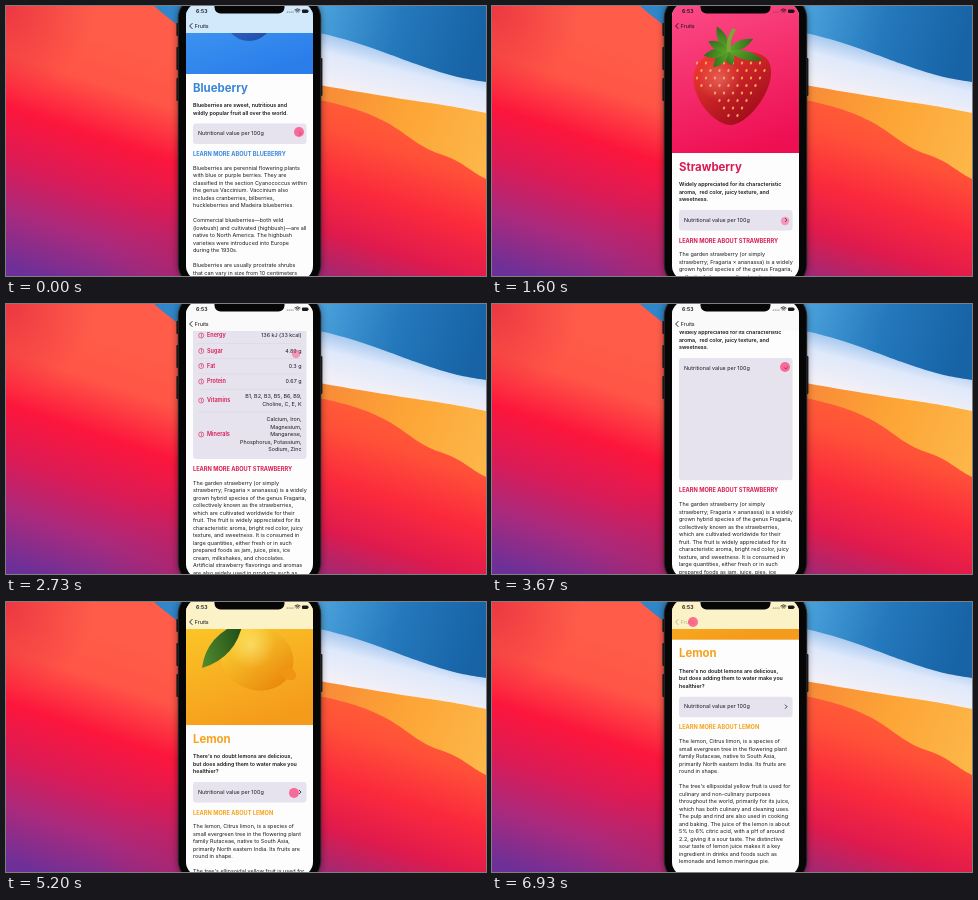
These frames come from a looping animation (480 px wide and 270 px high, 6.99 s). An HTML page with a canvas:

```html
<!DOCTYPE html>
<html lang="en">
<head>
<meta charset="utf-8">
<title>Fruits</title>
<style>
html, body { margin: 0; width: 100%; height: 100%; overflow: hidden; background: #e8374a; }
canvas { display: block; width: 480px; height: 270px; }
</style>
</head>
<body>
<canvas id="stage"></canvas>
<script>
const LOOP = 6990, LEFT = 180, WIDTH = 127, LINE = 7.5, CLOSED = 20.5, OPEN = 146;
const canvas = document.getElementById('stage');
const c = canvas.getContext('2d');
const dpr = window.devicePixelRatio || 1;
canvas.width = 480 * dpr;
canvas.height = 270 * dpr;

const fruits = [
  { name: 'Blueberry', accent: '#3a86d8', hero: ['#58b4fa', '#2b7eea'], skin: ['#4f86e0', '#1d4aa8'],
    intro: ['Blueberries are sweet, nutritious and', 'wildly popular fruit all over the world.'],
    body: ['Blueberries are perennial flowering plants', 'with blue or purple berries. They are',
      'classified in the section Cyanococcus within', 'the genus Vaccinium. Vaccinium also',
      'includes cranberries, bilberries,', 'huckleberries and Madeira blueberries.', '',
      'Commercial blueberries—both wild', '(lowbush) and cultivated (highbush)—are all',
      'native to North America. The highbush', 'varieties were introduced into Europe', 'during the 1930s.', '',
      'Blueberries are usually prostrate shrubs', 'that can vary in size from 10 centimeters'] },
  { name: 'Strawberry', accent: '#d81b52', hero: ['#fb4a86', '#ee0f52'], skin: ['#f23a32', '#9c0a1a'],
    intro: ['Widely appreciated for its characteristic', 'aroma,  red color, juicy texture, and', 'sweetness.'],
    facts: ['136 kJ (33 kcal)', '4.89 g', '0.3 g', '0.67 g', 'B1, B2, B3, B5, B6, B9,|Choline, C, E, K',
      'Calcium, Iron,|Magnesium,|Manganese,|Phosphorus, Potassium,|Sodium, Zinc'],
    body: ['The garden strawberry (or simply', 'strawberry; Fragaria × ananassa) is a widely',
      'grown hybrid species of the genus Fragaria,', 'collectively known as the strawberries,',
      'which are cultivated worldwide for their', 'fruit. The fruit is widely appreciated for its',
      'characteristic aroma, bright red color, juicy', 'texture, and sweetness. It is consumed in',
      'large quantities, either fresh or in such', 'prepared foods as jam, juice, pies, ice',
      'cream, milkshakes, and chocolates.', 'Artificial strawberry flavorings and aromas',
      'are also widely used in products such as', 'candy, soap, lip gloss, and perfume.'] },
  { name: 'Lemon', accent: '#f5a31c', hero: ['#fdd62c', '#f59b1b'], skin: ['#ffe23c', '#ea8a0c'],
    intro: ["There's no doubt lemons are delicious,", 'but does adding them to water make you', 'healthier?'],
    facts: ['121 kJ (29 kcal)', '2.5 g', '0.3 g', '1.1 g', 'B1, B2, B3, B5, B6, B9,|Choline, C',
      'Calcium, Iron,|Magnesium,|Manganese,|Phosphorus, Potassium,|Zinc'],
    body: ['The lemon, Citrus limon, is a species of', 'small evergreen tree in the flowering plant',
      'family Rutaceae, native to South Asia,', 'primarily North eastern India. Its fruits are', 'round in shape.', '',
      "The tree's ellipsoidal yellow fruit is used for", 'culinary and non-culinary purposes',
      'throughout the world, primarily for its juice,', 'which has both culinary and cleaning uses.',
      'The pulp and rind are also used in cooking', 'and baking. The juice of the lemon is about',
      '5% to 6% citric acid, with a pH of around', '2.2, giving it a sour taste. The distinctive',
      'sour taste of lemon juice makes it a key', 'ingredient in drinks and foods such as',
      'lemonade and lemon meringue pie.'] },
  { name: 'Plum', hero: ['#f0567c', '#d92850'], skin: ['#e8486a', '#94162f'],
    intro: ['There are a very nutritious fruit, an', 'excellent source of vitamins, minerals,', 'fiber and antioxidants.'] },
  { name: 'Lime', hero: ['#3dcf58', '#0f9a35'], skin: ['#8be04a', '#1f8a18'],
    intro: ['Sour, round, and bright green fruits.', 'Limes are high in vitamin C, antioxidants', 'and other nutrients.'] },
  { name: 'Pomegranate', hero: ['#f04d91', '#d11f5c'], skin: ['#ee4052', '#9a1029'],
    intro: ['Sweet, tart-shaped fruits that have been', 'enjoyed since ancient times. They can be', 'eaten crisp or soft.'] },
  { name: 'Pear', hero: ['#f8bd3c', '#e8891c'], skin: ['#e5df4d', '#a8a024'],
    intro: ['Sweet, bell-shaped fruits that have been', 'enjoyed since ancient times. They can be', 'eaten crisp or soft.'] }
];

// Helpers
const clamp = v => Math.max(0, Math.min(1, v));
const smooth = (t, start, span) => { const u = clamp((t - start) / span); return u * u * (3 - 2 * u); };
const easeOut = (t, start, span) => 1 - (1 - clamp((t - start) / span)) ** 3;

function text(s, x, y, size = 5.45, weight = 400, color = '#1b1b1e', align = 'left') {
  c.font = `${weight} ${size}px Inter, "Liberation Sans", sans-serif`;
  c.textAlign = align;
  c.textBaseline = 'middle';
  c.fillStyle = color;
  c.fillText(s, x, y);
}
function blend(x0, y0, x1, y1, ...colors) {
  const g = c.createLinearGradient(x0, y0, x1, y1);
  colors.forEach((color, i) => g.addColorStop(i / (colors.length - 1), color));
  return g;
}
function glow(x, y, r, color) {
  const g = c.createRadialGradient(x, y, 0, x, y, r);
  g.addColorStop(0, color);
  g.addColorStop(1, color.replace(/[\d.]+\)$/, '0)'));
  c.fillStyle = g;
  c.fillRect(x - r, y - r, 2 * r, 2 * r);
}
function box(x, y, w, h, r, fill) {
  c.beginPath();
  c.roundRect(x, y, w, h, r);
  c.fillStyle = fill;
  c.fill();
}
function shape(d, fill) {
  c.fillStyle = fill;
  c.fill(new Path2D(d));
}
function oval(x, y, rx, ry, fill, turn = 0) {
  c.beginPath();
  c.ellipse(x, y, rx, ry, turn, 0, 7);
  c.fillStyle = fill;
  c.fill();
}
function chevron(x, y, size, turn, color) {
  c.save();
  c.translate(x, y);
  c.rotate(turn);
  c.beginPath();
  c.moveTo(-size / 2, -size);
  c.lineTo(size / 2, 0);
  c.lineTo(-size / 2, size);
  c.strokeStyle = color;
  c.lineWidth = 0.9;
  c.stroke();
  c.restore();
}

function wallpaper() {
  // left slope: coral, a bright red fold, then magenta and purple
  c.fillStyle = blend(110, 30, 30, 270, '#ff5d4a', '#ff5546', '#fc163c', '#dc1b56', '#a82a7e', '#6c3098');
  c.fillRect(0, 0, 240, 270);
  glow(0, 0, 90, 'rgba(226,36,62,0.65)');
  glow(180, 270, 90, 'rgba(176,32,96,0.5)');
  shape('M148 0H200V40Q164 14 148 0Z', '#2f86c8');

  // right side: sky, pale fold, orange ribbon, red slope
  c.fillStyle = blend(315, 0, 470, 45, '#4ba2dc', '#2478bc', '#1763a6');
  c.fillRect(240, 0, 240, 140);
  shape('M240 16C330 24 370 44 410 58S455 72 480 76V170H240Z', blend(380, 32, 366, 88, '#86b6e8', '#dfe9fb', '#f3f0f6'));
  shape('M240 66C330 82 375 90 410 95S455 102 480 107V270H240Z', blend(315, 80, 480, 150, '#f88a38', '#fda536', '#fdb648'));
  shape('M240 80C330 96 352 102 376 114S410 140 434 148S462 164 480 173V270H240Z',
    blend(410, 100, 350, 285, '#ff6236', '#ff5038', '#fb2a3c', '#e01a4c', '#9a2a78'));
}

function leaf(x, y, len, wide, turn, light = '#69b52d', dark = '#245e18') {
  c.save();
  c.translate(x, y);
  c.rotate(turn);
  shape(`M0 0Q${len * .45} ${-wide} ${len} 0Q${len * .5} ${wide} 0 0Z`, blend(0, -wide, len, wide, light, dark));
  c.restore();
}

// Fruit art, about 76 px across at scale 1, centred on x, y
function drawFruit(f, x, y, scale) {
  c.save();
  c.translate(x, y);
  c.scale(scale, scale);
  const skin = blend(-25, -30, 25, 40, ...f.skin);
  if (f.name === 'Strawberry') {
    shape('M-5 -25C-28 -30 -42 -14 -39 5C-36 27 -15 47 -1 46C18 43 44 7 37 -15C32 -29 12 -29 -5 -25Z', skin);
    for (let row = 0; row < 8; row++)
      for (let col = -4; col < 5; col++) {
        const sx = col * 9 + (row % 2) * 4.5, sy = row * 7.5 - 16;
        if (Math.abs(sx + 1) < 36 - Math.max(0, sy) * .72) oval(sx, sy, 1.1, 1.6, '#f0a850', .3);
      }
    glow(-14, 0, 22, 'rgba(255,170,150,0.4)');
    [[-2, 27], [-.45, 28], [.25, 36], [1.3, 15], [2.3, 22], [2.95, 25], [3.6, 22]]
      .forEach(([a, len]) => leaf(-5, -28, len, 9, a));
    shape('M-6 -27Q-8 -41 0 -51L3 -49Q-4 -39 -2 -27Z', '#78a934');
  } else if (f.name === 'Lemon') {
    oval(10, 7, 37, 32, skin, .35);
    oval(41, 22, 9, 6, '#f09414', .6);
    glow(4, -6, 24, 'rgba(255,245,150,0.5)');
    leaf(-45, 17, 62, 19, -.85, '#5f9a34', '#123c10');
    shape('M-8 -26Q-4 -35 4 -40L6 -37Q-2 -32 -5 -24Z', '#477a20');
  } else if (f.name === 'Blueberry') {
    [[-19, -9, 24], [19, -10, 24], [2, 17, 24]].forEach(([bx, by, r]) => {
      oval(bx, by, r, r, skin);
      oval(bx + 2, by - 5, 7, 5, '#1b3f8c');
      glow(bx - 8, by - 9, 10, 'rgba(190,215,255,0.45)');
    });
    leaf(12, -28, 34, 10, -.4);
  } else {
    oval(0, 8, 30, 30, skin);
    if (f.name === 'Pear') oval(0, -15, 17, 22, skin);
    glow(-9, 0, 16, 'rgba(255,255,255,0.35)');
    leaf(0, -24, 26, 9, -.6);
  }
  c.restore();
}

function drawList(slide, selected) {
  c.fillStyle = '#fbfbfd';
  c.fillRect(LEFT, -4, WIDTH, 280);
  c.save();
  c.translate(-38 * (1 - slide), 0);
  fruits.forEach((f, i) => {
    const y = 63.3 + 33.7 * i;
    if (i === selected) {
      c.fillStyle = `rgba(196,196,202,${clamp((1 - slide) * 2.5)})`;
      c.fillRect(LEFT, y - 16.8, WIDTH + 40, 33.7);
    }
    box(184.5, y - 14, 28, 28, 4, blend(184, y - 14, 212, y + 14, ...f.hero));
    drawFruit(f, 198.5, y + 1, .3);
    text(f.name, 215, y - 3.3 - 1.7 * f.intro.length, 7.7, 650, '#111113');
    f.intro.forEach((s, k) => text(s, 215, y + 1.7 + 5 * k, 3.9, 400, '#8b8b91'));
    c.fillStyle = '#dedee2';
    c.fillRect(215, y + 16.6, 92, .3);
  });
  c.restore();
  c.fillStyle = `rgba(0,0,0,${.1 * (1 - slide)})`;
  c.fillRect(LEFT, -4, WIDTH, 280);
  c.globalAlpha = clamp(slide * 2);
  text('Fruits', 187, 30, 6 + 5.8 * slide, 550, '#111113');
  c.globalAlpha = 1;
}

function drawFacts(f, top) {
  const labels = ['Energy', 'Sugar', 'Fat', 'Protein', 'Vitamins', 'Minerals'];
  const rows = [22.5, 38, 53, 68.5, 87.5, 121.5];
  labels.forEach((label, i) => {
    const y = top + rows[i], lines = f.facts[i].split('|');
    c.beginPath();
    c.arc(195.2, y, 2.5, 0, 7);
    c.strokeStyle = f.accent;
    c.lineWidth = .6;
    c.stroke();
    text('i', 195.2, y, 3.8, 700, f.accent, 'center');
    text(label, 201, y, 5.5, 600, f.accent);
    lines.forEach((s, k) => text(s, 295.5, y + (k - (lines.length - 1) / 2) * LINE, 5.4, 400, '#1b1b1e', 'right'));
    c.fillStyle = 'rgba(120,110,140,.16)';
    c.fillRect(192, y - lines.length * LINE / 2 - 4, 103.5, .4);
  });
}

// Blurred bar: hides the text below and takes a tint while the hero is under it
function drawNavBar(f, scroll) {
  c.save();
  c.globalAlpha = clamp(scroll / 12);
  c.fillStyle = '#fafafb';
  c.fillRect(LEFT, -4, WIDTH, 31);
  c.globalAlpha *= .25 * clamp((147 - scroll) / 27);
  c.fillStyle = f.hero[0];
  c.fillRect(LEFT, -4, WIDTH, 31);
  c.restore();
}

function drawDetail(f, s) {
  const dx = s.slide * WIDTH;
  c.save();
  c.translate(dx, 0);
  if (dx > 0) {
    c.fillStyle = blend(LEFT - 5, 0, LEFT, 0, 'rgba(0,0,0,0)', 'rgba(0,0,0,.12)');
    c.fillRect(LEFT - 5, -4, 5, 280);
  }
  c.fillStyle = '#fdfdfe';
  c.fillRect(LEFT, -4, WIDTH, 280);
  c.save();
  c.translate(0, -s.scroll);
  c.fillStyle = blend(LEFT + 20, -4, LEFT + 70, 147, ...f.hero);
  c.fillRect(LEFT, -4, WIDTH, 151);
  drawFruit(f, 241, 73, 1);

  text(f.name, 187, 161.3, 11.4, 750, f.accent);
  f.intro.forEach((line, i) => text(line, 187, 178.4 + LINE * i, 5.3, 600));

  const top = 181.5 + LINE * f.intro.length;
  const height = CLOSED + (OPEN - CLOSED) * s.open;
  box(187, top, 113.5, height, 3, '#e6e2ee');
  if (s.open > 0 && f.facts) {
    c.save();
    c.beginPath();
    c.rect(187, top, 113.5, height);
    c.clip();
    c.globalAlpha = s.facts;
    drawFacts(f, top);
    c.restore();
  }
  text('Nutritional value per 100g', 192, top + 10);
  chevron(294, top + 10, 2, s.open * Math.PI / 2, '#2b2b30');

  const learn = top + height + 10.5;
  text('LEARN MORE ABOUT ' + f.name.toUpperCase(), 187, learn, 5.65, 650, f.accent);
  f.body.forEach((line, i) => text(line, 187, learn + 13.8 + LINE * i));
  c.restore();

  drawNavBar(f, s.scroll);
  c.restore();
}

function statusBar() {
  text('6:53', 190, 5.3, 5.2, 600, '#111113');
  for (let i = 0; i < 4; i++) oval(281.3 + i * 1.9, 6, .6, .6, '#55555a');
  c.strokeStyle = '#18181a';
  c.lineWidth = .8;
  for (const r of [1.6, 3, 4.4]) {
    c.beginPath();
    c.arc(291.5, 7.4, r, -2.3, -.84);
    c.stroke();
  }
  box(296, 3.4, 6, 3.6, 1, '#18181a');
  box(302.4, 4.5, .6, 1.4, .2, '#18181a');
}

// Pointer path: time, x, y
const path = [[0, 293, 126], [150, 293, 126], [440, 201, 20], [540, 201, 20], [880, 246, 97], [1050, 246, 97],
  [1480, 293, 215], [1700, 293, 215], [2050, 290, 245], [2150, 290, 245], [2710, 290, 50], [2830, 290, 50],
  [3170, 290, 95], [3430, 293, 63], [3720, 293, 63], [4000, 201, 20], [4110, 201, 20], [4440, 246, 131],
  [4720, 246, 131], [5000, 288, 215], [5080, 288, 215], [5480, 288, 105], [5640, 293, 105], [6440, 293, 105],
  [6830, 201, 20], [LOOP, 201, 20]];
const presses = [[0, 100], [460, 540], [960, 1050], [1610, 1690], [2120, 2700], [2840, 3180], [3520, 3720],
  [4030, 4110], [4530, 4720], [5060, 5490], [5760, 5990], [6310, 6420], [6880, LOOP]];

function drawPointer(t, down) {
  const i = Math.max(0, path.findIndex(k => k[0] > t) - 1);
  const [t0, x0, y0] = path[i], [t1, x1, y1] = path[i + 1];
  const u = smooth(t, t0, t1 - t0), r = down ? 5 : 4.2;
  oval(x0 + (x1 - x0) * u, y0 + (y1 - y0) * u, r, r, down ? 'rgba(255,62,120,.72)' : 'rgba(255,62,120,.45)');
}

function state(t) {
  if (t < 1000) return { index: 0, slide: easeOut(t, 520, 350), scroll: 79, open: 0, facts: 0 };
  if (t < 4480) {
    const closing = smooth(t, 3582, 320);
    return { index: 1, slide: 1 - easeOut(t, 1010, 450) + easeOut(t, 4080, 350),
      scroll: 195 * smooth(t, 2150, 560) - 45 * smooth(t, 2830, 340),
      open: smooth(t, 1650, 320) - closing, facts: clamp(1 - closing * 6) };
  }
  const closing = smooth(t, 6360, 320);
  return { index: 2, slide: 1 - easeOut(t, 4593, 450), scroll: 109.3 * smooth(t, 5080, 400),
    open: smooth(t, 5800, 320) - closing, facts: clamp(1 - closing * 6) };
}

function drawPhone() {
  for (const [y, h] of [[17, 13], [41, 23], [72, 23]]) box(170.4, y, 3, h, 1, '#19191c');
  box(314, 52, 2.4, 38, 1, '#19191c');
  c.save();
  c.shadowColor = 'rgba(0,0,0,.45)';
  c.shadowBlur = 7 * dpr;
  box(171.8, -10, 143.4, 291, 22, '#2a2a2e');
  c.restore();
  box(172.8, -9, 141.4, 289, 21, '#060607');
}

function draw(t) {
  c.setTransform(dpr, 0, 0, dpr, 0, 0);
  const s = state(t);
  const down = presses.some(([a, b]) => t >= a && t < b);
  wallpaper();
  drawPhone();

  c.save();
  c.beginPath();
  c.roundRect(LEFT, -3, WIDTH, 277, 14);
  c.clip();
  if (s.slide > 0) drawList(s.slide, s.index);
  if (s.slide < 1) drawDetail(fruits[s.index], s);

  const backPressed = down && (t > 6870 || (t > 440 && t < 550) || (t > 4020 && t < 4120));
  c.globalAlpha = clamp(1 - s.slide * 2) * (backPressed ? .3 : 1);
  chevron(185, 20, 2.8, Math.PI, '#111113');
  text('Fruits', 188.8, 20.2, 5.3, 400, '#111113');
  c.globalAlpha = 1;
  statusBar();
  box(208.5, -8, 70, 15.5, 6, '#060607');
  drawPointer(t, down);
  c.restore();
}

const start = performance.now();
function frame() {
  draw((performance.now() - start) % LOOP);
  requestAnimationFrame(frame);
}
frame();
</script>
</body>
</html>
```
